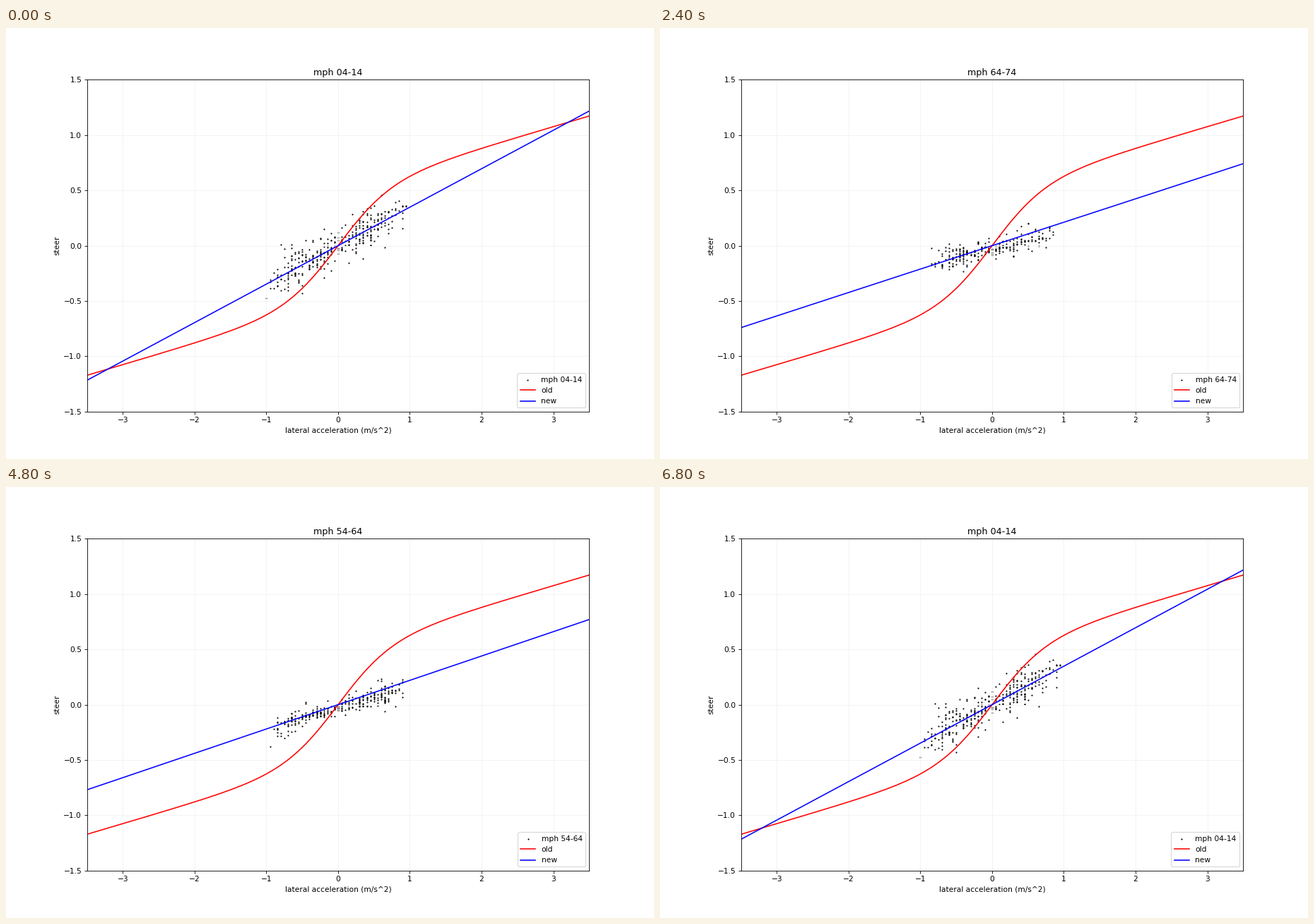
A matplotlib script for the animation above (7200 ms loop, 917 by 611 pixels).

```python
import numpy as np
import matplotlib.pyplot as plt
from matplotlib.animation import FuncAnimation

EDGES = [*range(4, 94, 10), 90]
BINS = len(EDGES) - 1
X = np.linspace(-3.5, 3.5, 400)


def old_fit(x):
    return 0.5 * np.tanh(2.6531725 * x / 2) + 0.1919765 * x


def new_slope(i):
    u = np.log((EDGES[i] + 5) / 9)
    return (1.217 - 0.2883 * u + 0.0268 * u ** 2) / 3.5


def make_points(i):
    """Samples around the new line; fast bins are sparser, narrower, flatter."""
    rng = np.random.default_rng(40 + i)
    gain = 1 - (i / 8) ** 4
    reach = 1 - 0.5 * (i / 8) ** 5
    n = int(60 + 260 * gain)
    x = reach * (2 * rng.beta(1.5, 1.5, n) - 1)
    x = np.round(x / 0.05) * 0.05
    spread = 0.02 + 0.04 * np.abs(x) + 0.04 * ((i - 4) / 4) ** 2
    noise = np.clip(rng.standard_t(5, n), -3.2, 3.2)
    return x, gain * new_slope(i) * x - 0.005 * i + spread * noise


POINTS = [make_points(i) for i in range(BINS)]

fig, ax = plt.subplots(figsize=(12.00655, 8), dpi=76.375)


def draw(frame):
    # up through the speed bins, then back down
    i = min(frame, 2 * BINS - 1 - frame)
    label = f"mph {EDGES[i]:02d}-{EDGES[i + 1]:02d}"
    ax.cla()
    ax.scatter(*POINTS[i], s=1, color="black", label=label)
    ax.plot(X, old_fit(X), color="red", label="old")
    ax.plot(X, new_slope(i) * X, color="blue", label="new")
    ax.set_title(label)
    ax.set_xlabel("lateral acceleration (m/s^2)")
    ax.set_ylabel("steer")
    ax.set_xlim(-3.5, 3.5)
    ax.set_ylim(-1.5, 1.5)
    ax.grid(color="0.95")
    ax.legend(loc="lower right")
    return []


anim = FuncAnimation(fig, draw, frames=2 * BINS, interval=400,
                     init_func=lambda: draw(0), repeat=True, repeat_delay=0)
plt.show()
```
